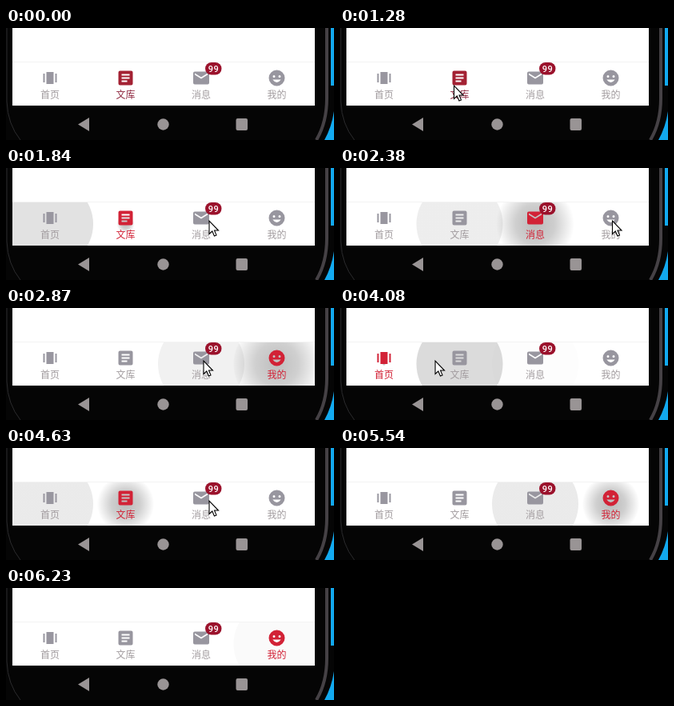
Recreate the animation shown at these times as an HTML page. Size 410x140 px, loop 6.78 s.

```html
<!DOCTYPE html>
<html lang="zh">
<head>
<meta charset="utf-8">
<style>
html, body { margin: 0; width: 100%; height: 100%; overflow: hidden; background: #000; }
svg { display: block; }
.label { font: 12px "Noto Sans CJK SC", "Noto Sans CJK", sans-serif; text-anchor: middle; }
.badge { font: 500 11px Roboto, sans-serif; letter-spacing: .5px; text-anchor: middle; }
</style>
</head>
<body>
<svg width="410" height="140" viewBox="0 0 410 140">
  <defs><clipPath id="bar"><rect x="8" y="43" width="378" height="54"/></clipPath></defs>
  <rect width="410" height="140" fill="#12a9ef"/>
  <path d="M0 0H406V72H410V104Q407 124 398 140H0Z" fill="#050505"/>
  <path d="M401 0V88Q401 118 388 140" fill="none" stroke="#454145" stroke-width="4"/>
  <path d="M1 0V92Q2 120 18 140" fill="none" stroke="#2b2b2d"/>
  <rect x="8" width="378" height="97" fill="#fff"/>
  <path d="M8 42.5H386" stroke="#f3f3f3"/>
  <g id="ripples" clip-path="url(#bar)"></g>
  <g id="tabs"></g>
  <rect x="249" y="43" width="20.500" height="15.500" rx="7.750" fill="#9b122c"/>
  <text class="badge" x="259.500" y="54.700" fill="#fff">99</text>
  <g fill="#999495">
    <path d="M90 120.500L104 112V129Z"/>
    <circle cx="196.500" cy="120.500" r="7.200"/>
    <rect x="287.500" y="113" width="14.500" height="15" rx="2"/>
  </g>
  <g id="cursor">
    <circle id="halo" cy="-1" r="12" fill="#fdfa80"/>
    <path d="M0 0V16.500L3.800 13L6.400 19L9 17.900L6.500 12H11.500Z" fill="#fff" stroke="#000" stroke-width="1.100"/>
  </g>
</svg>
<script>
const LOOP = 6780, LAST_CHANGE = 6230;
const GRAY = '#98969f', TEXT_GRAY = '#a29c9f';
const NS = 'http://www.w3.org/2000/svg';
const byId = id => document.getElementById(id);
const clamp = v => Math.max(0, Math.min(1, v));
const mix = (a, b, k) => a + (b - a) * k;
const smooth = k => k * k * (3 - 2 * k);

function set(el, attrs) {
  for (const key in attrs) el.setAttribute(key, attrs[key]);
}
function add(parent, name, attrs) {
  const el = document.createElementNS(NS, name);
  set(el, attrs);
  return parent.appendChild(el);
}

// aim: where the pointer tip rests, relative to the tab centre
const tabs = [
  { name: '首页', aim: 0, icon: 'M-4.5 -7.5h9v15h-9zM-8.5 -5.5h2v11h-2zM6.5 -5.5h2v11h-2z' },
  { name: '文库', aim: -7, icon: 'M-7 -9H7Q9 -9 9 -7V7Q9 9 7 9H-7Q-9 9 -9 7V-7Q-9 -9 -7 -9zM-5 -5v2h10v-2zM-5 -1v2h10v-2zM-5 3v2h7v-2z' },
  { name: '消息', aim: 10, icon: 'M-8 -8H8Q10 -8 10 -6V6Q10 8 8 8H-8Q-10 8 -10 6V-6Q-10 -8 -8 -8zM-8 -6v2L0 1L8 -4v-2L0 -1z' },
  { name: '我的', aim: 2, icon: 'M-10 0a10 10 0 1 1 20 0a10 10 0 1 1 -20 0zM-5 -2a1.5 1.5 0 1 0 3 0a1.5 1.5 0 1 0 -3 0zM2 -2a1.5 1.5 0 1 0 3 0a1.5 1.5 0 1 0 -3 0zM-5.2 2Q0 9 5.2 2z' }
];

// The pointer walks back and forth over the tabs; the app responds later.
const tour = [...'0123210123'].map(Number);
const arrival = i => 800 + 478 * i;
const response = i => 1330 + 455 * i;
const MOVE = 200, ENTER = 170;

const ripples = byId('ripples'), defs = document.querySelector('defs');
tabs.forEach((tab, i) => {
  tab.x = 55 + 94.5 * i;
  const gradient = add(defs, 'radialGradient', { id: 'glow' + i });
  tab.stops = [0, .5, .95, 1].map(offset => add(gradient, 'stop', { offset }));
  tab.ripple = add(ripples, 'circle', { cx: tab.x, cy: 70, fill: `url(#glow${i})` });
  tab.shape = add(byId('tabs'), 'path', {
    d: tab.icon, 'fill-rule': 'evenodd', transform: `translate(${tab.x} 62.5)`
  });
  tab.label = add(byId('tabs'), 'text', { class: 'label', x: tab.x, y: 87.5 });
  tab.label.textContent = tab.name;
});

// A soft spot grows, hardens into a flat disc and fades once released.
function drawRipple(tab, age, released) {
  const flat = clamp((age - 150) / 200);
  const opacity = Math.exp(-Math.max(0, released) / 170);
  set(tab.ripple, { r: 54 * clamp(age / 150) ** 1.6, opacity: opacity < .04 ? 0 : opacity });
  const soft = [.27, .19, .02, 0];
  tab.stops.forEach((stop, i) => set(stop, { 'stop-opacity': mix(soft[i], .16, flat) }));
}

function drawTabs(t) {
  const latest = tour.findLastIndex((_, i) => t >= response(i));
  const selected = latest < 0 ? 1 : tour[latest];
  tabs.forEach(tab => set(tab.ripple, { opacity: 0 }));
  for (let i = 0; i <= latest; i++) {
    drawRipple(tabs[tour[i]], t - response(i), t - response(i + 1));
  }
  const [active, activeText] = latest < 0 ? ['#a32133', '#8f2940'] : ['#d22236', '#d22236'];
  tabs.forEach((tab, i) => {
    set(tab.shape, { fill: i === selected ? active : GRAY });
    set(tab.label, { fill: i === selected ? activeText : TEXT_GRAY });
  });
}

function restPoint(i) {
  if (i < 0) return [190, 140];
  if (i >= tour.length) return [350, -60];
  const tab = tabs[tour[i]];
  const overshoot = tour[i] < tour[i - 1] ? -7 : 0;
  return [tab.x + tab.aim + overshoot, i < 2 ? 72 : 66];
}

function drawCursor(t) {
  const i = Math.max(0, Math.ceil((t - arrival(0)) / (arrival(1) - arrival(0))));
  const start = i === 0 ? ENTER : arrival(i) - MOVE;
  const k = smooth(clamp((t - start) / (arrival(i) - start)));
  const from = restPoint(i - 1), to = restPoint(i);
  const sinceArrival = t - arrival(i - 1);
  const pressed = i > 0 && i <= tour.length && sinceArrival > 170 && sinceArrival < 278;
  set(byId('cursor'), {
    visibility: t < ENTER ? 'hidden' : 'visible',
    transform: `translate(${mix(from[0], to[0], k)} ${mix(from[1], to[1], k)})`
  });
  set(byId('halo'), { opacity: pressed ? 1 : 0 });
}

const begin = performance.now();
function tick() {
  const t = Math.min(LAST_CHANGE, (performance.now() - begin) % LOOP);
  drawTabs(t);
  drawCursor(t);
  requestAnimationFrame(tick);
}
tick();
</script>
</body>
</html>
```
